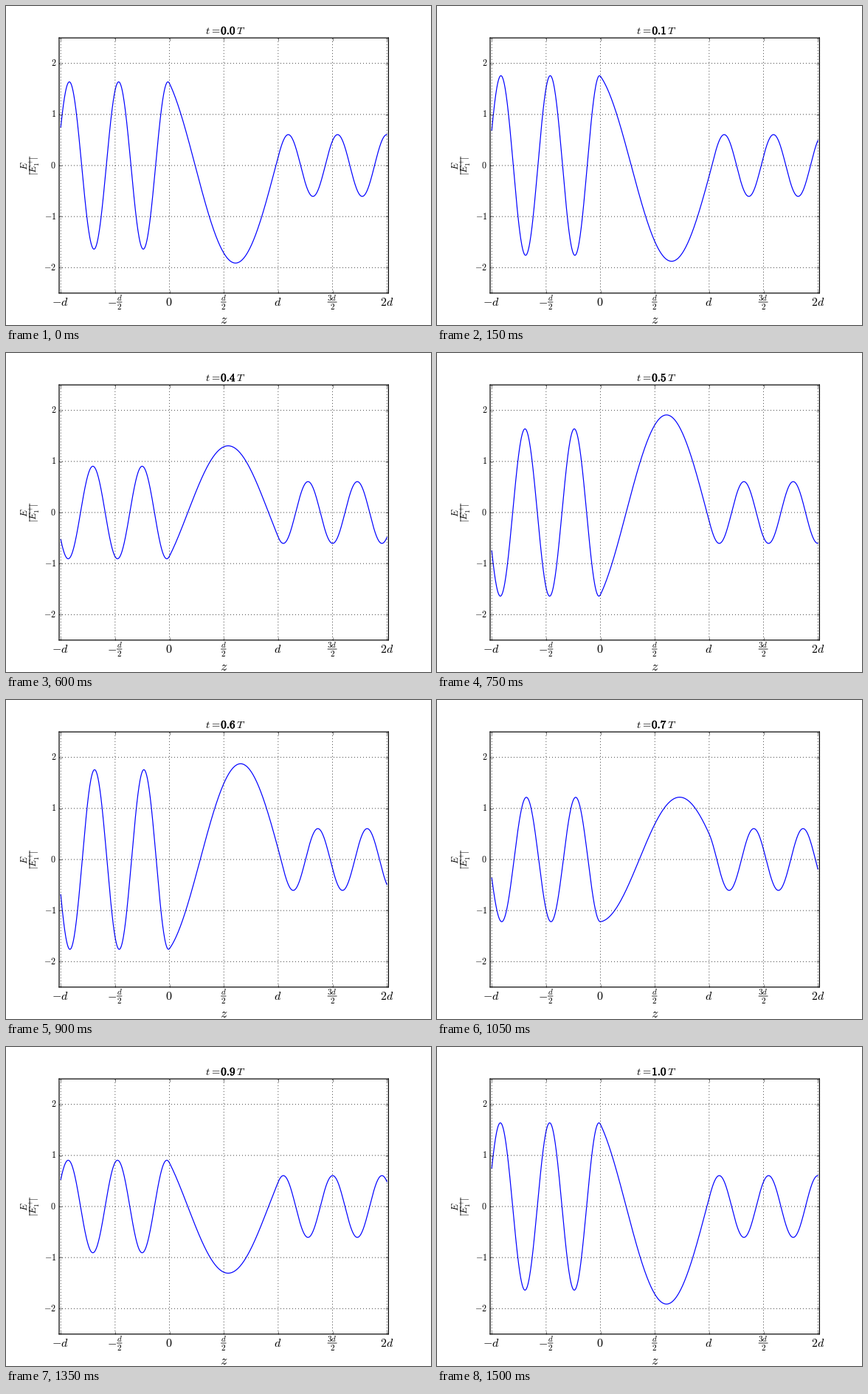
These frames come from a looping animation (576x432 px, 1.65 s). A matplotlib script:

```python
import matplotlib.pyplot as plt
import numpy as np
from matplotlib import patheffects
from matplotlib.animation import FuncAnimation
from matplotlib.lines import Line2D

WIDTH, HEIGHT, DPI = 576, 432, 72
FRAMES, INTERVAL = 11, 150

# Wave through a slab 0 < z < d (d = 1), same medium on both sides.
K1 = 13.855         # wave number outside the slab
RATIO = 3.276       # outside wave number over inside wave number
K2 = K1 / RATIO

plt.style.use("classic")
plt.rcParams.update({
    "mathtext.fontset": "cm",
    "path.snap": False,
    "axes.linewidth": 1.2,
    "grid.linewidth": 0.75,
})


def continue_wave(field, slope, k, dz):
    """Carry a field and its slope over a distance dz in a uniform medium."""
    c, s = np.cos(k * dz), np.sin(k * dz)
    return field * c + slope / k * s, slope * c - field * k * s


def complex_field(z):
    """Field for a unit incident wave; the outgoing wave is real at z = 2d."""
    at_exit = np.exp(-1j * K1)
    exit_slope = 1j * K1 * at_exit
    at_entry, entry_slope = continue_wave(at_exit, exit_slope, K2, -1)
    incident = abs(at_entry + entry_slope / (1j * K1)) / 2
    left = continue_wave(at_entry, entry_slope, K1, z)[0]
    slab = continue_wave(at_exit, exit_slope, K2, z - 1)[0]
    right = np.exp(1j * K1 * (z - 2))
    return np.where(z < 0, left, np.where(z < 1, slab, right)) / incident


fig = plt.figure(figsize=(WIDTH / DPI, HEIGHT / DPI), dpi=DPI, facecolor="white")
ax = fig.add_axes([0.125, 0.1, 0.775, 0.8])
ax.set_xlim(-1.015, 2.015)
ax.set_ylim(-2.5, 2.5)
ax.grid(True)


def put_text(x, y, text, size, ha="center", rotation=0):
    """Place a text baseline by pixel position, measured from the top left."""
    return fig.text(x / WIDTH, 1 - y / HEIGHT, text, fontsize=size, ha=ha,
                    va="baseline", rotation=rotation, rotation_mode="anchor")


def put_fraction(x, y, top, bottom, size, length, rotation=0):
    """Set a fraction with its bar centred at a pixel position."""
    down = np.array([1, 0]) if rotation else np.array([0, 1])
    along = down[::-1] * length / 2
    center = np.array([x, y])
    for name, shift in ((top, -0.144), (bottom, 0.595)):
        put_text(*(center + down * shift * size), f"${name}$", 0.7 * size,
                 rotation=rotation)
    ends = np.array([center - along, center + along])
    fig.add_artist(Line2D(ends[:, 0] / WIDTH, 1 - ends[:, 1] / HEIGHT,
                          color="black", lw=0.8))


def tick_pixel(z):
    return 71.6 + 446.4 * (z + 1.015) / 3.03


ax.set_xticks(np.linspace(-1, 2, 7), [""] * 7)
for z_tick, name in ((-1, "-d"), (0, "0"), (1, "d"), (2, "2d")):
    put_text(tick_pixel(z_tick), 405.5, f"${name}$", 16)
put_text(tick_pixel(-0.5) - 4.3, 405.5, "$-$", 16)
put_fraction(tick_pixel(-0.5) + 6.2, 401, "d", "2", 16, 6.5)
put_fraction(tick_pixel(0.5), 401, "d", "2", 16, 6.5)
put_fraction(tick_pixel(1.5), 401, "3d", "2", 16, 12)

y_ticks = range(-2, 3)
ax.set_yticks(y_ticks, [f"${y}$" for y in y_ticks], fontsize=12)

put_text(295.5, 430, "$z$", 18)
put_fraction(32, 216, "E", "|E_1^{+}|", 18, 23.5, rotation=90)

put_text(270.5, 38.2, r"$t\hspace{0.08}=$", 14.4, ha="left")
put_text(311.5, 38.2, "$T$", 14.4, ha="left")
clock = put_text(301.5, 38.2, "", 15.2)
clock.set_path_effects([patheffects.withStroke(linewidth=0.5, foreground="black")])

z = np.linspace(-1, 2, 901)
field = complex_field(z)
line, = ax.plot(z, field.real, color="blue", lw=1.2)


def update(i):
    t = i / 10
    line.set_ydata((field * np.exp(-2j * np.pi * t)).real)
    clock.set_text(rf"$\mathbf{{{t:.1f}}}$")
    return line, clock


anim = FuncAnimation(fig, update, frames=FRAMES, interval=INTERVAL,
                     repeat=True, repeat_delay=0, blit=False)
plt.show()
```
